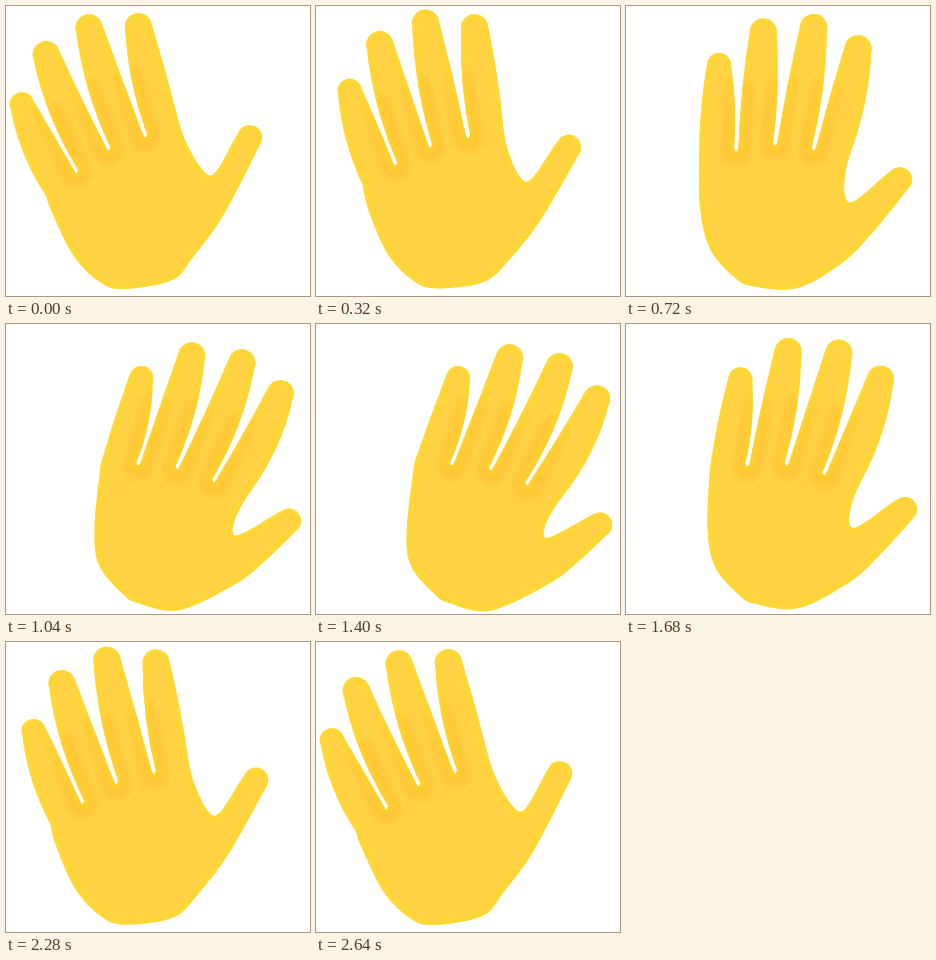
Recreate the animation shown at these times as an HTML page with a canvas. Size 304 by 290 pixels, loop 2.68 s.

```html
<!DOCTYPE html>
<html>
<head>
<meta charset="utf-8">
<title>Waving hand</title>
<style>
html, body { margin: 0; width: 100%; height: 100%; overflow: hidden; background: #fff; }
canvas { display: block; }
</style>
</head>
<body>
<canvas id="stage" width="304" height="290"></canvas>
<script>
const ctx = document.getElementById('stage').getContext('2d');
const LOOP = 2680, STEP = 40, SWING = 2540;
const PIVOT = [136, 240];
const ARC = 40 * Math.PI / 180;
const THUMB_TURN = .72;

const add = (a, b, k = 1) => [a[0] + b[0] * k, a[1] + b[1] * k];
const mid = (a, b) => [(a[0] + b[0]) / 2, (a[1] + b[1]) / 2];
const unit = (a, b) => {
  const dx = b[0] - a[0], dy = b[1] - a[1], len = Math.hypot(dx, dy);
  return [dx / len, dy / len];
};

// Lean runs from -0.5 (far left) to a little past 0.5 (far right).
function leanAt(time) {
  const phase = 2 * Math.PI * Math.min(1, time / SWING);
  return .54 * (1 - Math.cos(phase + .04 * Math.sin(phase))) - .5;
}

// Fingers and valleys swing around the palm; the palm edge slides with them.
function jointsAt(lean) {
  const turn = (x, y, share = 1) => {
    const a = lean * ARC * share, c = Math.cos(a), s = Math.sin(a);
    const dx = x - PIVOT[0], dy = y - PIVOT[1];
    return [PIVOT[0] + dx * c - dy * s, PIVOT[1] + dx * s + dy * c];
  };
  const slide = (x, y, dx, dy) => [x + dx * lean, y + dy * lean];
  return {
    pinky: turn(71.5, 65.6),
    ring: turn(111.4, 27.4),
    middle: turn(160.9, 16.8),
    index: turn(207.6, 32.5),
    thumb: turn(267.4, 161.7, THUMB_TURN),
    valleys: [turn(99, 149), turn(137, 139), turn(176, 139)],
    web: turn(219.6, 189, THUMB_TURN),
    knuckle: turn(213, 135),
    pinkyBase: turn(63, 160),
    palm: [
      slide(239, 222, 42, 28),
      slide(209, 255, 44, 8),
      slide(170, 280, 8, 12),
      slide(124, 281, 16, -4),
      slide(104, 272, 26, -4),
      slide(80, 245, 27, -6),
      slide(67, 205, 43, 0)
    ]
  };
}

function fingerShape(left, right, tip, radius, bend, bulge) {
  const base = mid(left, right), dir = unit(base, tip), normal = [-dir[1], dir[0]];
  const start = add(tip, normal, -radius), end = add(tip, normal, radius);
  const shift = [(tip[0] - base[0]) * bend, 0];
  return {
    left, right, tip, radius, start, end,
    angle: Math.atan2(dir[1], dir[0]),
    leftBow: add(add(mid(left, start), shift), normal, -bulge),
    rightBow: add(add(mid(end, right), shift), normal, bulge)
  };
}

function traceTip(path, f) {
  path.arc(...f.tip, f.radius, f.angle - Math.PI / 2, f.angle + Math.PI / 2);
}

function traceThrough(path, pts) {
  for (let i = 0; i < pts.length - 1; i++) {
    const a = pts[i], b = pts[i + 1];
    const before = pts[i - 1] || a, after = pts[i + 2] || b;
    path.bezierCurveTo(
      a[0] + (b[0] - before[0]) / 6, a[1] + (b[1] - before[1]) / 6,
      b[0] - (after[0] - a[0]) / 6, b[1] - (after[1] - a[1]) / 6, ...b);
  }
}

function handPath(j) {
  const path = new Path2D();
  const tips = [j.pinky, j.ring, j.middle, j.index];
  const fingers = tips.map((tip, i) => fingerShape(
    i ? add(j.valleys[i - 1], [2.2, -3]) : j.pinkyBase,
    i < 3 ? add(j.valleys[i], [-2.2, -3]) : j.knuckle,
    tip, i ? 13.5 : 12, .14, 4.5));

  path.moveTo(...j.pinkyBase);
  fingers.forEach((f, i) => {
    if (i) path.quadraticCurveTo(...add(j.valleys[i - 1], [0, 3]), ...f.left);
    path.quadraticCurveTo(...f.leftBow, ...f.start);
    traceTip(path, f);
    path.quadraticCurveTo(...f.rightBow, ...f.right);
  });

  const thumb = fingerShape(j.web, j.palm[0], j.thumb, 12.3, 0, 0);
  const down = unit(fingers[3].rightBow, j.knuckle), along = unit(j.web, thumb.start);
  path.bezierCurveTo(...add(j.knuckle, down, 25), ...add(j.web, [-8, -1]), ...j.web);
  path.bezierCurveTo(...add(j.web, [8, 0]), ...add(thumb.start, along, -20), ...thumb.start);
  traceTip(path, thumb);
  traceThrough(path, [thumb.end, ...j.palm, j.pinkyBase]);
  path.closePath();
  return path;
}

// Stacked translucent strokes fade out like a blur.
function softStroke(path, color, maxWidth, layers) {
  ctx.strokeStyle = color;
  ctx.lineCap = ctx.lineJoin = 'round';
  for (let i = 1; i <= layers; i++) {
    ctx.lineWidth = maxWidth * i / layers;
    ctx.stroke(path);
  }
}

function shadeBetween(j) {
  const tips = [j.pinky, j.ring, j.middle, j.index];
  j.valleys.forEach((valley, i) => {
    const line = new Path2D();
    line.moveTo(...valley);
    line.lineTo(...add(valley, unit(valley, mid(tips[i], tips[i + 1])), 62));
    softStroke(line, 'rgba(248,166,34,.065)', 34, 9);
  });
}

function draw(now) {
  const time = Math.floor((now % LOOP) / STEP) * STEP;
  const joints = jointsAt(leanAt(time));
  const path = handPath(joints);
  ctx.fillStyle = '#fff';
  ctx.fillRect(0, 0, 304, 290);
  ctx.fillStyle = '#ffd144';
  ctx.fill(path);
  ctx.save();
  ctx.clip(path);
  shadeBetween(joints);
  softStroke(path, 'rgba(255,215,48,.16)', 16, 6);
  ctx.restore();
}

const began = performance.now();
function tick() {
  draw(performance.now() - began);
  requestAnimationFrame(tick);
}
tick();
</script>
</body>
</html>
```
